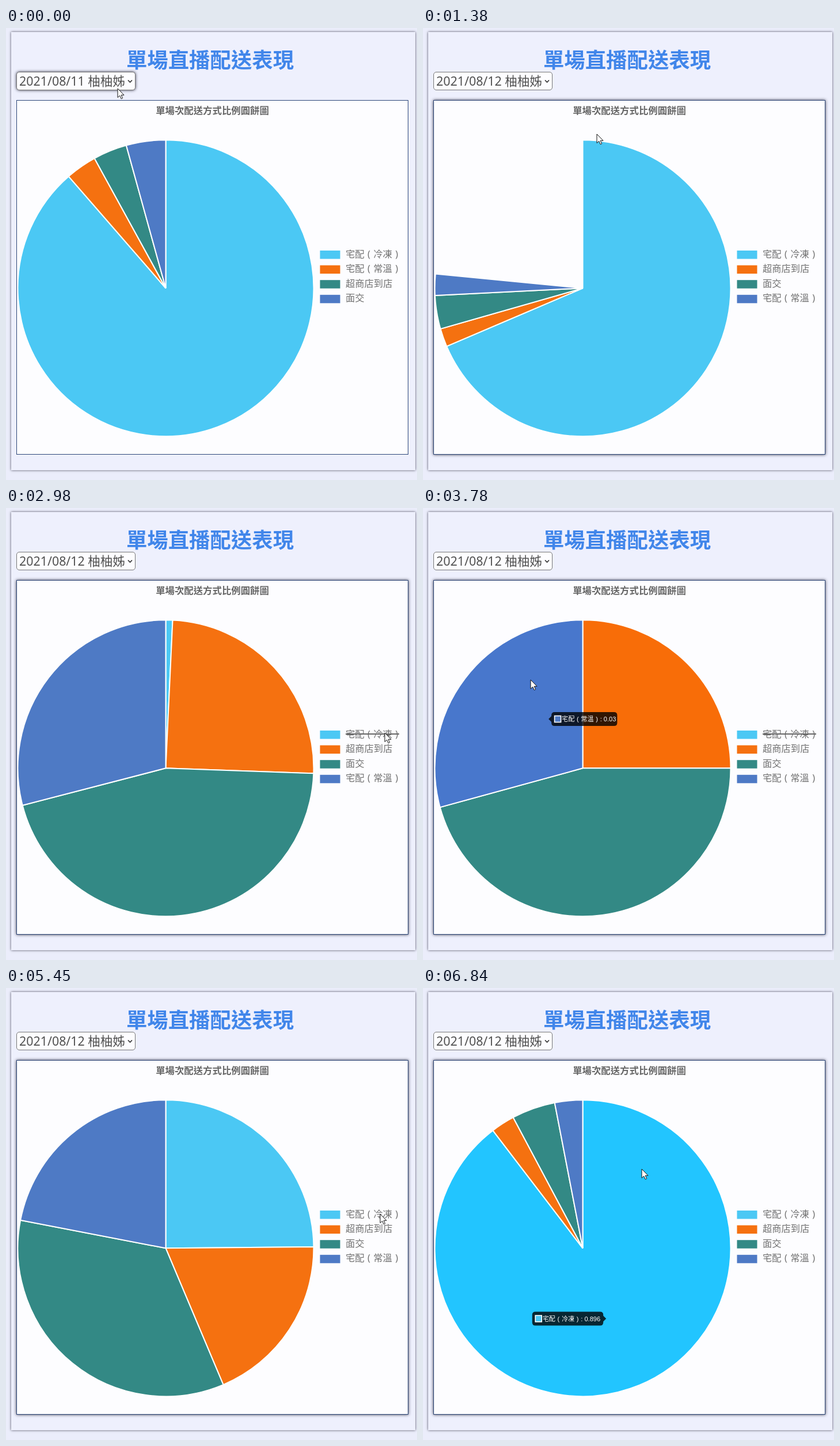
An HTML page that plays this animation: 714 px wide and 784 px high, repeating every 7.17 s.

```html
<!DOCTYPE html>
<html lang="zh-Hant">
<head>
<meta charset="utf-8">
<title>單場直播配送表現</title>
<style>
html, body { margin: 0; width: 714px; height: 784px; overflow: hidden; background: #ebedfb; }
div { position: absolute; box-sizing: border-box; }
.card { left: 9px; top: 7px; width: 702px; height: 760px; background: #eef0fd; box-shadow: 0 0 4px #445; }
.select { left: 18px; top: 76px; width: 207px; height: 32px; background: #fdfdff; border: 1px solid #767676; border-radius: 5px; }
.panel { left: 18px; top: 125px; width: 681px; height: 615px; background: #fdfdff; border: 1px solid #2c4678; }
.lit { box-shadow: 0 0 5px #334; }
svg { position: absolute; left: 0; top: 0; }
text { font-family: "Noto Sans", "Noto Sans CJK TC", "Noto Sans CJK", sans-serif; fill: #666; }
.title { font-size: 36.4px; font-weight: 700; fill: #4186ea; }
.choice { font-size: 21.4px; font-weight: 300; fill: #505050; }
.caption { font-size: 16.4px; font-weight: 700; }
.legend text { font-size: 16.3px; font-weight: 300; fill: #707070; }
#slices path { stroke: #fff; stroke-width: 2; stroke-linejoin: bevel; }
#tip text { font: 11.1px "Liberation Sans", "Noto Sans CJK TC", "Noto Sans CJK", sans-serif; fill: #fff; }
</style>
</head>
<body>
<div class="card"></div>
<div class="select" id="select"></div>
<div class="panel" id="panel"></div>
<svg width="714" height="784" viewBox="0 0 714 784">
  <text class="title" x="354.5" y="69" text-anchor="middle">單場直播配送表現</text>
  <text class="choice" id="choice" x="23" y="100"></text>
  <path d="M212 90.5l3.5 3.5l3.5-3.5" fill="none" stroke="#333" stroke-width="1.7"/>
  <text class="caption" x="358.5" y="149" text-anchor="middle">單場次配送方式比例圓餅圖</text>
  <g id="slices"></g>
  <g class="legend" id="legend"></g>
  <path id="strike" d="M590 392H683" stroke="#666" stroke-width="2"/>
  <g id="tip">
    <path id="bubble" fill="#000" fill-opacity=".8"/>
    <rect id="swatch" width="11" height="11" stroke="#fff" stroke-width="1.6"/>
    <text id="tipText"></text>
  </g>
  <path id="cursor" d="M0 0V15.5L3.7 12.2L6.2 17.8L8.6 16.7L6.2 11.3H11Z" fill="#fff" stroke="#111"/>
</svg>
<script>
const LOOP = 7170, CX = 277.5, CY = 451.3, R = 257;
const SWITCH = 1077, HIDE = 2283, SHOW = 5373;
const base = [[75, 200, 244], [245, 113, 16], [51, 137, 133], [78, 122, 197]];
const hover = [[34, 197, 255], [250, 106, 3], [32, 141, 136], [62, 114, 216]];
const first = [.886, .034, .037, .043];
const second = [.8961, .026, .0475, .0304];
const rest = [0, .25, .4575, .2925];

// brackets centred in a full-width cell
const cell = c => `\u2004${c}\u2004`;
const home = kind => `宅配${cell('(')}${kind}${cell(')')}`;
const firstNames = [home('冷凍'), home('常溫'), '超商店到店', '面交'];
const secondNames = [home('冷凍'), '超商店到店', '面交', home('常溫')];
const values = ['0.896', '0.026', '0.047', '0.03'];

// time, hovered slice (-1 = none)
const hovers = [[3400, 1], [3734, 3], [4450, 2], [4854, 1], [4885, -1], [5968, 0]];

// time, x, y of the pointer
const path = [
  [0, 194, 105], [250, 194, 105], [600, 180, 142], [1080, 180, 148], [1380, 302, 184],
  [1600, 420, 260], [2130, 658, 390], [3080, 658, 390], [3400, 520, 372], [3690, 335, 312],
  [3780, 187, 298], [4100, 178, 320], [4450, 200, 475], [4720, 390, 530], [4870, 578, 417],
  [5200, 650, 392], [5450, 650, 392], [5960, 470, 297], [6500, 380, 314]
];

const $ = id => document.getElementById(id);
const mix = (a, b, k) => a + (b - a) * k;
const clamp = k => Math.min(1, Math.max(0, k));
const quart = k => 1 - (1 - clamp(k)) ** 4;
const rgb = c => `rgb(${c.map(Math.round)})`;
const set = (el, attrs) => { for (const k in attrs) el.setAttribute(k, attrs[k]); };
function add(parent, tag, attrs) {
  const el = document.createElementNS('http://www.w3.org/2000/svg', tag);
  set(el, attrs);
  return parent.appendChild(el);
}

const slices = base.map(() => add($('slices'), 'path', {}));
const labels = base.map((c, i) => {
  const y = 386 + i * 25.6;
  add($('legend'), 'rect', { x: 545.5, y, width: 35, height: 14.5, fill: rgb(c) });
  return add($('legend'), 'text', { x: 590, y: y + 11.5 });
});

const tipLabels = secondNames.map((n, i) => `${n}: ${values[i]}`);
const widths = tipLabels.map(s => {
  $('tipText').textContent = s;
  return $('tipText').getComputedTextLength() + 23;
});

function point(turn, r) {
  const a = turn * 2 * Math.PI;
  return [CX + r * Math.sin(a), CY - r * Math.cos(a)];
}

function shares(t) {
  if (t < SWITCH) return first;
  const grow = quart((t - SWITCH) / 1000);
  const hidden = quart((t - HIDE) / 1000) - quart((t - SHOW) / 1000);
  return second.map((v, i) => mix(v, rest[i], hidden) * grow);
}

function glow(t, slice) {
  let level = 0;
  hovers.forEach(([at, id], i) => {
    const next = hovers[i + 1];
    if (id !== slice || t < at) return;
    level = quart((t - at) / 400);
    if (next && t > next[0]) level *= 1 - quart((t - next[0]) / 400);
  });
  return level;
}

function drawPie(t) {
  let from = 0;
  shares(t).forEach((part, i) => {
    const [x1, y1] = point(from, R), [x2, y2] = point(from + part, R);
    const k = glow(t, i);
    set(slices[i], {
      d: part > .0005 ? `M${CX} ${CY}L${x1} ${y1}A${R} ${R} 0 ${+(part > .5)} 1 ${x2} ${y2}Z` : '',
      fill: rgb(base[i].map((c, j) => mix(c, hover[i][j], k)))
    });
    from += part;
  });
}

// resting place of a slice's tooltip
function tipBox(i) {
  const parts = i ? rest : second;
  const start = parts.slice(0, i).reduce((a, b) => a + b, 0);
  const [x, y] = point(start + parts[i] / 2, R / 2);
  const left = x <= CX;
  return { x: left ? x + 5.5 : x - 5.5 - widths[i], y: y + .5, w: widths[i], left };
}

function drawTip(t) {
  const past = hovers.filter(h => h[0] <= t);
  const last = past[past.length - 1];
  const shown = past.filter(h => h[1] >= 0);
  const cur = shown[shown.length - 1];
  let alpha = 0;
  if (last) {
    const fresh = past.length === 1 || past[past.length - 2][1] < 0;
    const fade = clamp((t - last[0]) / 200);
    alpha = last[1] < 0 ? 1 - fade : fresh ? fade : 1;
  }
  $('tip').setAttribute('opacity', alpha);
  if (!alpha) return;

  const i = cur[1], to = tipBox(i);
  const prev = past[past.indexOf(cur) - 1];
  const was = prev && prev[1] >= 0 ? tipBox(prev[1]) : to;
  const k = quart((t - cur[0]) / 400);
  const x = mix(was.x, to.x, k), y = mix(was.y, to.y, k), w = mix(was.w, to.w, k);
  const caret = to.left ? `M${x} ${y - 5}l-5 5l5 5Z` : `M${x + w} ${y - 5}l5 5l-5 5Z`;
  const q = 5.5, h = 24 - 2 * q;
  set($('bubble'), {
    d: `M${x + q} ${y - 12}h${w - 2 * q}q${q} 0 ${q} ${q}v${h}q0 ${q} ${-q} ${q}` +
       `h${2 * q - w}q${-q} 0 ${-q} ${-q}v${-h}q0 ${-q} ${q} ${-q}Z${caret}`
  });
  set($('swatch'), { x: x + 5.5, y: y - 5.5, fill: rgb(base[i]) });
  set($('tipText'), { x: x + 18, y: y + 4 });
  $('tipText').textContent = tipLabels[i];
}

function drawCursor(t) {
  const n = path.findIndex(p => p[0] > t);
  const b = path[n < 0 ? path.length - 1 : n];
  const a = n < 0 ? b : path[n - 1];
  let k = n < 0 ? 0 : (t - a[0]) / (b[0] - a[0]);
  k = k * k * (3 - 2 * k);
  $('cursor').setAttribute('transform', `translate(${mix(a[1], b[1], k)} ${mix(a[2], b[2], k)})`);
}

function draw(t) {
  const changed = t >= SWITCH;
  $('choice').textContent = `2021/08/${changed ? 12 : 11} 柚柚姊`;
  $('select').classList.toggle('lit', !changed);
  $('panel').classList.toggle('lit', changed);
  labels.forEach((el, i) => el.textContent = (changed ? secondNames : firstNames)[i]);
  $('strike').setAttribute('visibility', t >= HIDE && t < SHOW ? 'visible' : 'hidden');
  drawPie(t);
  drawTip(t);
  drawCursor(t);
}

const begin = performance.now();
function tick() {
  draw((performance.now() - begin) % LOOP);
  requestAnimationFrame(tick);
}
tick();
</script>
</body>
</html>
```
